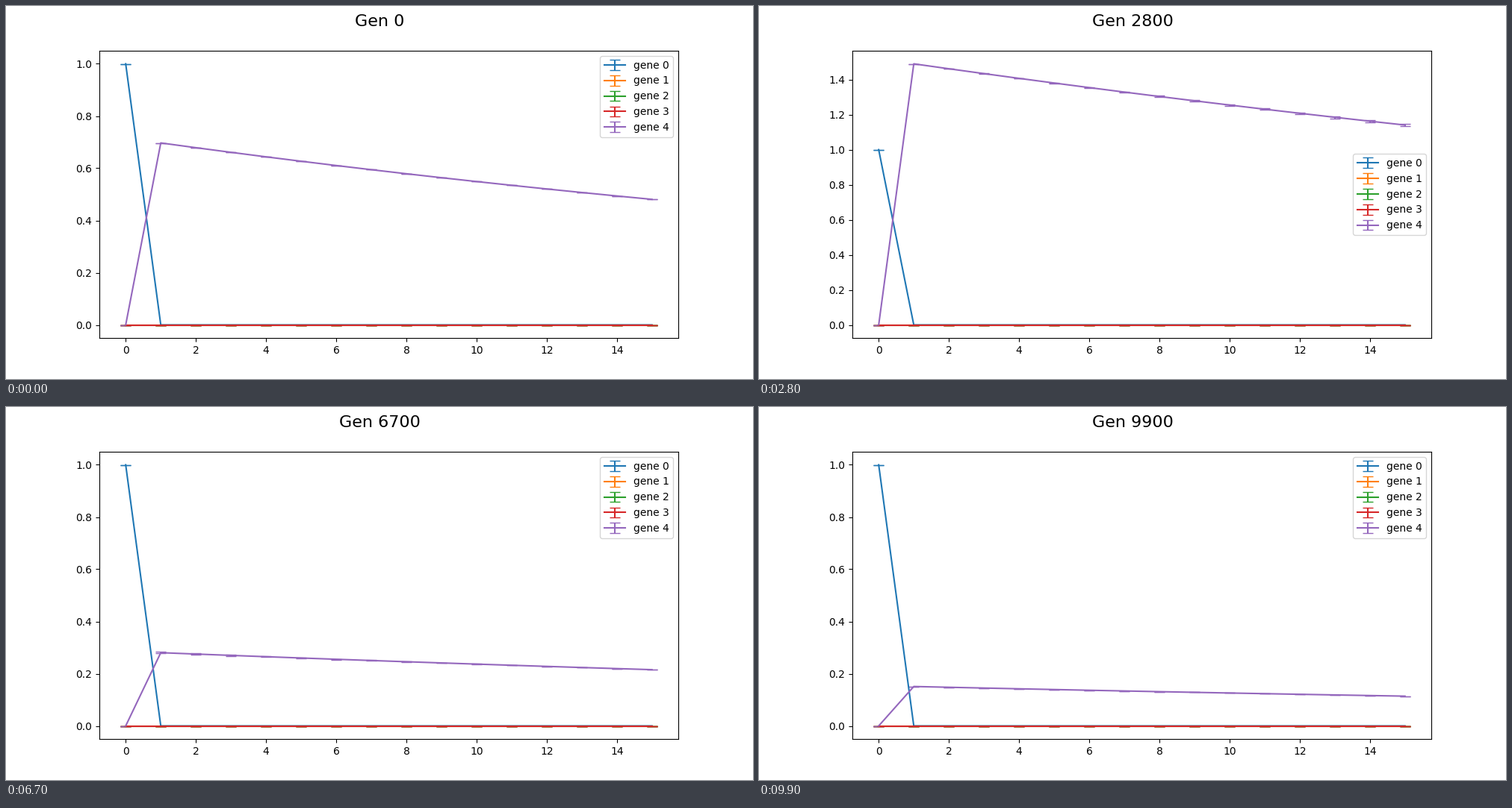
Write a matplotlib script that moves like this. It is 1000x500 px and loops after 10000 ms.

```python
import numpy as np
import matplotlib.pyplot as plt
from matplotlib.animation import FuncAnimation

FRAMES = 100
STEP = 100  # generations per frame, also ms per frame
GENES = 5

# turning points of the last gene: frame, peak level, share left at the end
TURNS = [0, 15, 19, 37, 51, 67, 86, 99]
PEAK = [0.697, 1.69, 1.532, 1.4485, 0.592, 0.2805, 0.8025, 0.151]
KEPT = [0.69, 0.84, 0.852, 0.679, 0.628, 0.768, 0.65, 0.755]

x = np.arange(16)
s = (x[1:] - 1) / 14

fig = plt.figure(figsize=(10, 5), dpi=100)
ax = fig.add_subplot()
title = fig.suptitle("Gen 0", y=0.978, fontsize=16)


def bump(i, centre, width):
    return np.exp(-((i - centre) / width) ** 2)


def decay(i):
    """Geometric fall from the peak to the share that is kept."""
    peak = np.exp(np.interp(i, TURNS, np.log(PEAK)))
    return peak * np.interp(i, TURNS, KEPT) ** s


def spread(i):
    """Error that grows along x early on and shrinks along x later."""
    early = 0.0155 * bump(i, 19, 10) * s
    late = 0.0053 * bump(i, 56, 13) * (1 - 1.2 * s)
    return np.abs(early + late)


def draw(i):
    ax.clear()
    mean = np.zeros((GENES, x.size))
    err = np.zeros_like(mean)
    mean[0, 0] = 1
    mean[-1, 1:] = decay(i)
    err[-1, 1:] = spread(i)
    for g in range(GENES):
        ax.errorbar(x, mean[g], yerr=err[g], capsize=5, label=f"gene {g}")
    ax.legend(loc="best")
    title.set_text(f"Gen {i * STEP}")
    return []


anim = FuncAnimation(fig, draw, frames=FRAMES, init_func=lambda: draw(0),
                     interval=STEP, repeat=True, repeat_delay=0)
plt.show()
```
